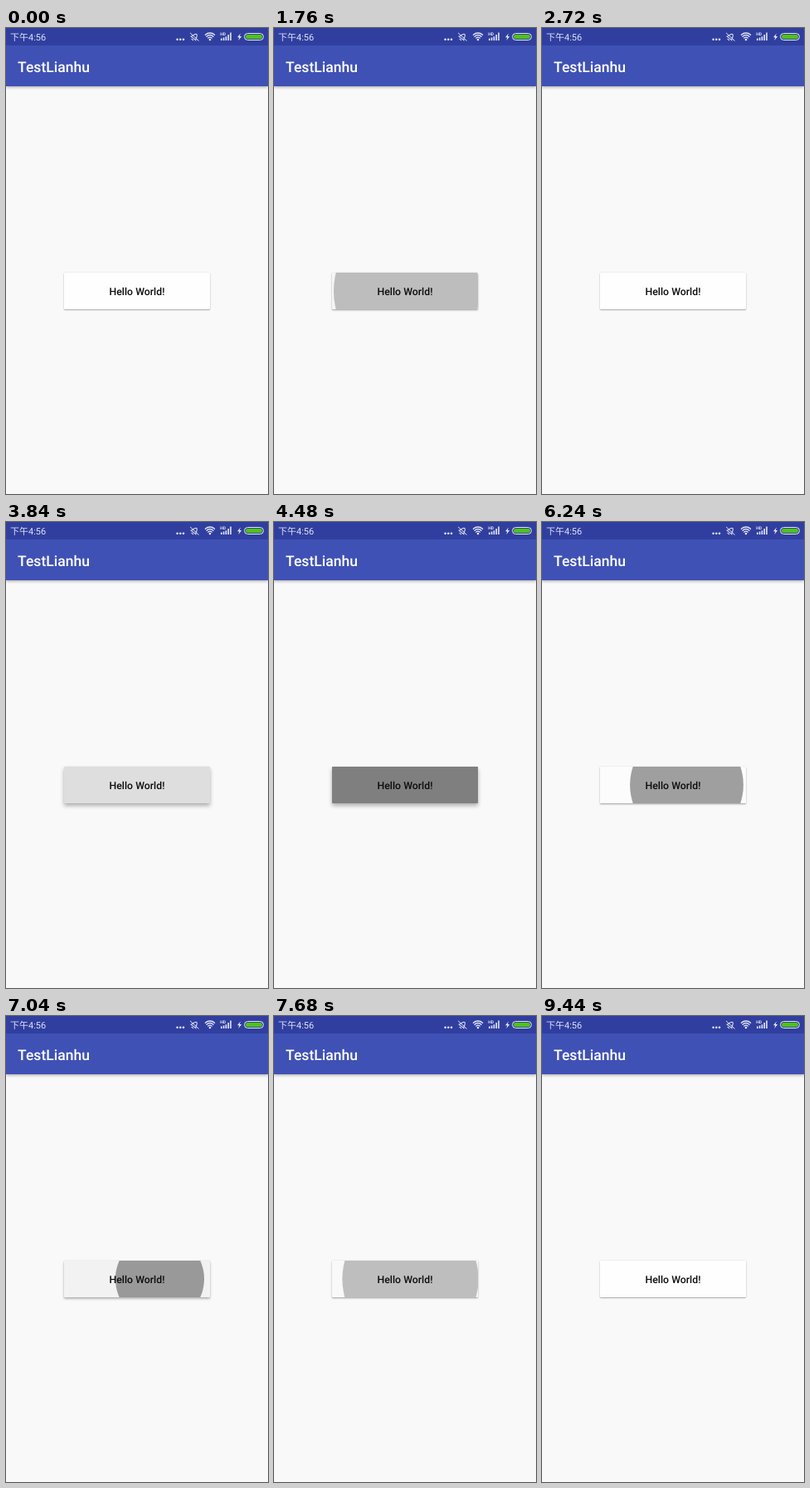
An HTML page that plays this animation: 316 px wide and 560 px high, repeating every 9760 ms.

```html
<!DOCTYPE html>
<html lang="zh">
<head>
<meta charset="utf-8">
<title>Ripple button</title>
<style>
  html, body { margin: 0; width: 100%; height: 100%; overflow: hidden; background: #f9f9fa; }
  #stage { position: absolute; left: 0; top: 0; width: 316px; height: 560px; overflow: hidden; }
  #stage > * { position: absolute; }
  #bar { left: 0; top: 0; width: 316px; height: 70px; background: #3f51b5;
    box-shadow: 0 1.5px 3.5px rgba(0,0,0,.32); }
  #status { left: 0; top: 0; width: 316px; height: 21px; background: #303f9f; }
  #button, #wash { left: 70px; top: 294px; width: 176px; height: 44px; border-radius: .7px; }
  #button { background: #fefefe; }
  #wash { overflow: hidden; }
  #top { left: 0; top: 0; }
  text { font-family: Roboto, "Noto Sans CJK SC", "Noto Sans CJK", sans-serif;
    text-rendering: geometricPrecision; }
</style>
</head>
<body>
<div id="stage">
  <div id="bar"></div>
  <div id="status"></div>
  <div id="button"></div>
  <svg id="wash">
    <rect id="tint" width="176" height="44"/>
    <circle id="wave" cy="22"/>
  </svg>
  <svg id="top" width="316" height="560">
    <text x="5" y="15" font-size="11" fill="#dfe2f2">下午4:56</text>
    <text x="14" y="53" font-size="17.56" font-weight="500" fill="#fff">TestLianhu</text>
    <text x="158" y="321" font-size="12.29" font-weight="500" fill="#0c0c0c" text-anchor="middle">Hello World!</text>
    <g fill="#e4e7f5">
      <circle cx="206.6" cy="13.7" r="1.3"/>
      <circle cx="210.3" cy="13.7" r="1.3"/>
      <circle cx="214" cy="13.7" r="1.3"/>
      <circle cx="246" cy="14" r="1.3"/>
      <text x="258.3" y="9" font-size="5" font-weight="700">HD</text>
      <path d="M259 15v-2.5h1.6v2.5zM261.8 15v-3.5h1.6v3.5zM264.6 15v-4.8h1.6v4.8zM267.4 15v-7h1.6v7zM270.2 15v-9.5h1.6v9.5z"/>
      <path d="M282.8 6.5L279 11.3h2.3L280.3 15l3.9-5h-2.4z"/>
    </g>
    <g fill="none" stroke="#e4e7f5" stroke-linecap="round">
      <path d="M223.8 12.8c1.3-1.3.9-5.8 3.6-6.3 2.7.5 2.3 5 3.6 6.3zM226.2 14.8h2.4" transform="rotate(38 227.3 10.5)"/>
      <path d="M222.4 6.2l9.8 9"/>
      <path d="M240.4 8.3a8 8 0 0 1 11.2 0M242 10.2a5.6 5.6 0 0 1 8 0M243.7 12.1a3.2 3.2 0 0 1 4.6 0" stroke-width="1.3"/>
    </g>
    <rect x="287.5" y="6.5" width="23" height="8" rx="4" fill="#3a4291" stroke="#e4e7f5"/>
    <rect x="289" y="8" width="20" height="5" rx="2.5" fill="#4cc417"/>
  </svg>
</div>
<script>
const LOOP = 9760, STEP = 160;
const TOUCH = 155, MID = 88, REACH = 90.8;
const TINT = .21, WAVE = .37;

// When the finger goes down and up, in ms
const presses = [
  { down: 1406, up: 1646 },
  { down: 3690, up: 4940 },
  { down: 6130, up: 6166 },
  { down: 6860, up: 6990 },
  { down: 7430, up: 7569 }
];
const el = id => document.getElementById(id);
const button = el('button'), tint = el('tint'), wave = el('wave');
const clamp = x => Math.min(1, Math.max(0, x));
const decay = (age, span) => Math.exp(-Math.max(0, age) / span);
const easeOut = x => 1 - (1 - clamp(x)) ** 4;

function poseAt(time) {
  const press = presses.findLast(p => p.down <= time);
  if (!press) return { tintAlpha: 0, waveAlpha: 0, progress: 0, lift: 0 };
  const { down, up } = press;
  const held = Math.min(time, up) - down;
  const freed = time - up;
  const spread = time - Math.min(down + 150, up);
  const settle = decay(freed, 60);
  return {
    tintAlpha: TINT * clamp(held / 250) * settle,
    waveAlpha: spread > 0 ? WAVE * decay(freed - 74, 85) : 0,
    // the wave speeds up once the finger leaves
    progress: easeOut(spread / 700 + Math.max(0, freed) / 390),
    lift: clamp(held / 120) * settle
  };
}

function draw(now) {
  const time = Math.floor(now % LOOP / STEP) * STEP;
  const { tintAlpha, waveAlpha, progress, lift } = poseAt(time);
  tint.setAttribute('fill-opacity', tintAlpha.toFixed(4));
  wave.setAttribute('fill-opacity', waveAlpha.toFixed(4));
  wave.setAttribute('cx', TOUCH + (MID - TOUCH) * progress);
  wave.setAttribute('r', REACH * progress);
  button.style.boxShadow =
    `0 ${1 + 2 * lift}px ${1.5 + 3.5 * lift}px rgba(0,0,0,.3),` +
    `0 0 1.5px rgba(0,0,0,${.16 - .08 * lift})`;
}

const begin = performance.now();
function tick() {
  draw(performance.now() - begin);
  requestAnimationFrame(tick);
}
tick();
</script>
</body>
</html>
```
